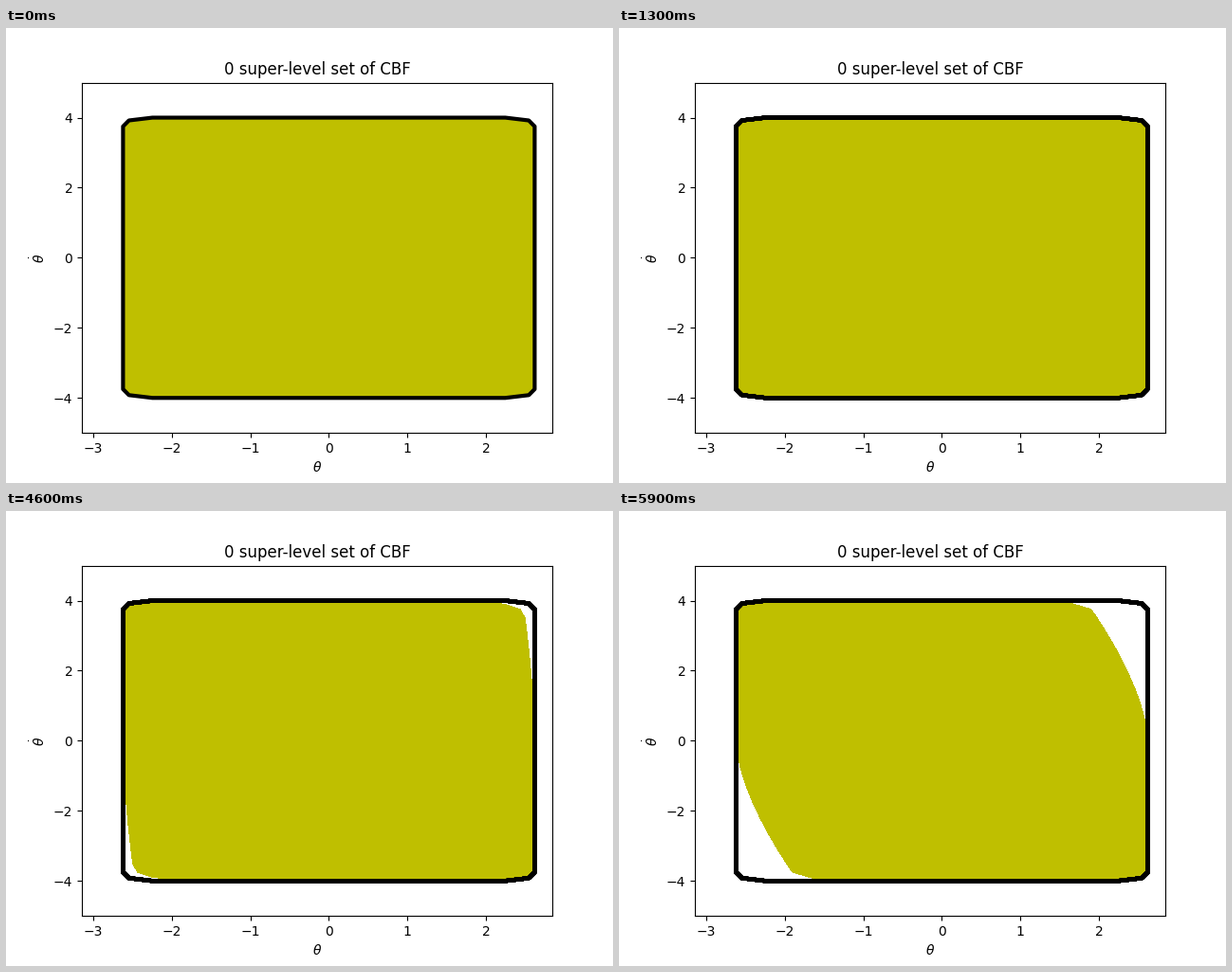
Recreate the animation shown at these times as a matplotlib script. Size 640x480 px, loop 6 s.

```python
import numpy as np
import matplotlib.pyplot as plt
from matplotlib.animation import FuncAnimation
from matplotlib.collections import PolyCollection

FRAMES, STEP_MS = 60, 100
EDGE, TOP, ROW = 5 * np.pi / 6, 4.0, 3.75
CELL = 2 * np.pi / 21
COLS = CELL * (np.arange(9) + 0.5)[::-1]  # positive grid angles, outermost first


def rest_height(cols):
    """Upper boundary of the initial set at the grid angles."""
    return np.where(cols > 2.4, 3.92, TOP)


def corner(t):
    """Upper right boundary, from zero velocity up and inwards, at t seconds."""
    shrink = (0.1275 * max(t - 3.592, 0)) ** 2
    y = np.linspace(0, ROW, 16)
    x = EDGE - shrink * y ** 1.6
    s = np.clip((t - 4.2) / 1.7, 0, 1)
    x[-1] -= 0.26 * s * (1 - s)
    cols = COLS[COLS < x[-1]]
    sunk = TOP - 0.25 * np.exp((cols - x[-1]) / 0.22)
    w = min(1, shrink / 0.006)
    roof = (1 - w) * rest_height(cols) + w * sunk
    return np.column_stack([np.r_[x, cols], np.r_[y, roof]])


def region(t):
    """Closed outline, symmetric about the origin."""
    fixed = corner(0)[::-1] * [-1, 1]
    half = np.vstack([corner(t), fixed])
    return np.vstack([half, -half])


fig, ax = plt.subplots(figsize=(6.4, 4.8), dpi=100)
ax.set_xlim(-np.pi, np.pi - CELL)
ax.set_ylim(-5, 5)
ax.set_title("0 super-level set of CBF")
ax.set_xlabel(r"$\theta$")
ax.set_ylabel(r"$\dot{\theta}$")

safe_set = PolyCollection([region(0)], facecolors="y", edgecolors="none",
                          antialiaseds=False, zorder=1)
start = np.array([(EDGE, ROW), (COLS[0], 3.92), (COLS[1], TOP)])
loop = np.vstack([start, start[::-1] * [-1, 1], -start, start[::-1] * [1, -1]])
outline = PolyCollection([loop], facecolors="none", edgecolors="k",
                         linewidths=3, zorder=2)
ax.add_collection(safe_set, autolim=False)
ax.add_collection(outline, autolim=False)


def update(i):
    safe_set.set_verts([region(i * STEP_MS / 1000)])
    # The outline is drawn once more each step, so its soft edges darken.
    outline.set_verts([loop] * (i + 1))
    return safe_set, outline


anim = FuncAnimation(fig, update, frames=FRAMES, interval=STEP_MS,
                     repeat=True, repeat_delay=0)
plt.show()
```
